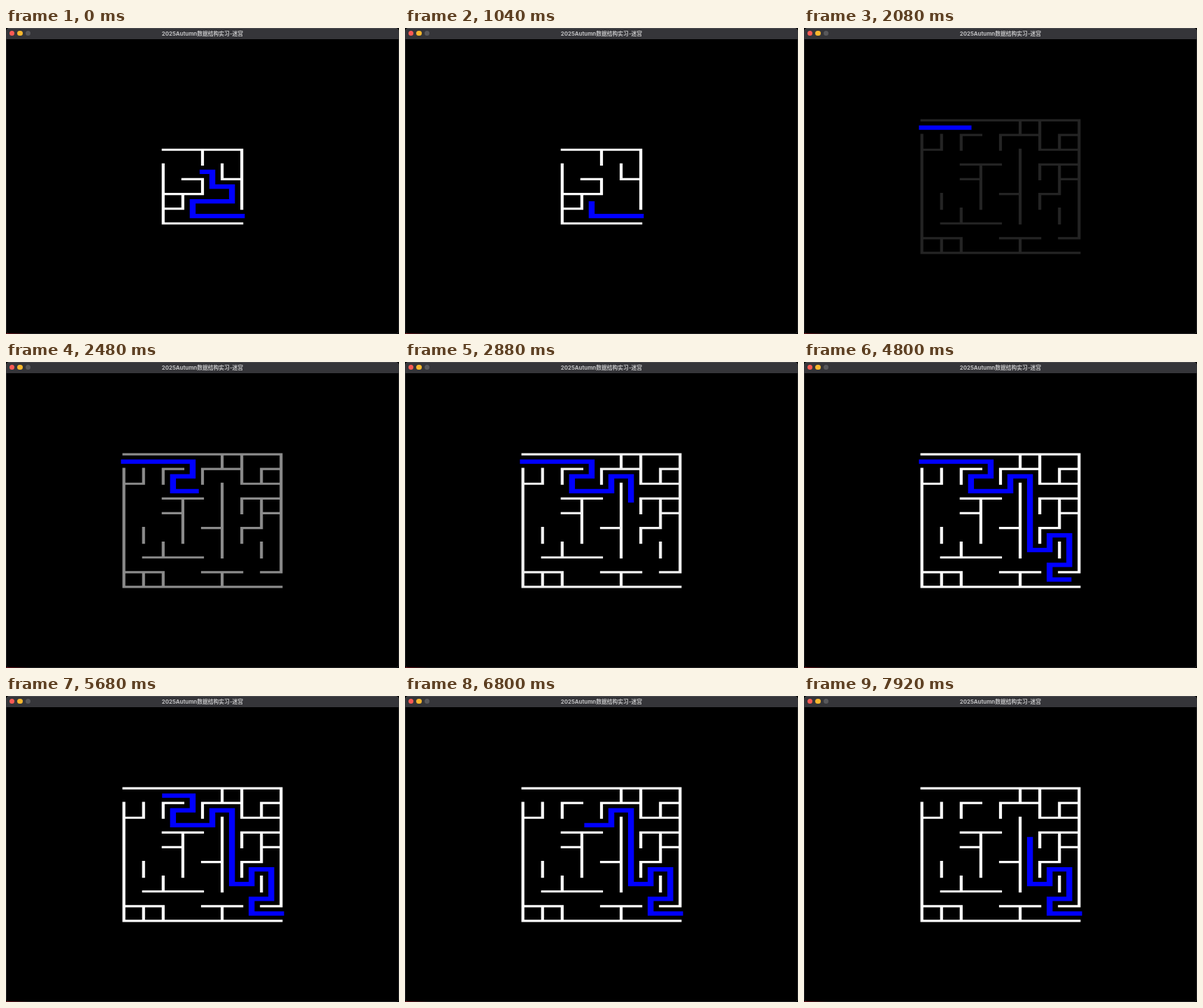
Animation, 562 px wide and 438 px high, one loop 8000 ms. Source, as an HTML page with a canvas:

```html
<!DOCTYPE html>
<html lang="zh">
<head>
<meta charset="utf-8">
<style>
  html, body { margin: 0; width: 100%; height: 100%; overflow: hidden; background: #000; }
  .window { position: absolute; left: 0; top: 0; width: 562px; height: 438px; overflow: hidden; }
  .bar {
    position: absolute; inset: 0 0 auto 0; height: 16px; box-sizing: border-box;
    background: #353539; border-top: 1px solid #4b4b4e; border-radius: 5px 5px 0 0;
    color: #c0c0c2; text-align: center; white-space: nowrap;
    font: 700 7.8px/14px Inter, "Noto Sans CJK SC", "Noto Sans CJK", sans-serif;
  }
  .light { position: absolute; top: 4px; width: 7.4px; height: 7.4px; border-radius: 50%; }
  canvas { position: absolute; left: 0; top: 0; }
  .edge {
    position: absolute; inset: 16px 0 0 0; border: 1px solid #232325; border-top: 0;
    border-radius: 0 0 5px 5px;
  }
  .glow { position: absolute; left: 0; bottom: 0; width: 34px; height: 1px; background: linear-gradient(90deg, #701018, #232325); }
</style>
</head>
<body>
<div class="window">
  <canvas id="stage" width="562" height="438"></canvas>
  <div class="edge"></div>
  <div class="glow"></div>
  <div class="bar">2025Autumn数据结构实习-迷宫</div>
  <div class="light" style="left:4.5px;background:#fb5a54"></div>
  <div class="light" style="left:16.2px;background:#f8b82e"></div>
  <div class="light" style="left:27.9px;background:#58585b"></div>
</div>
<script>
const ctx = document.getElementById('stage').getContext('2d');
const LOOP = 8000, SWITCH = 1940, FADE = 990;
const CELL_W = 28.1, CELL_H = 21.1;

// Coordinates are in cells; each route runs from entrance to exit.
const smallMaze = {
  cols: 4, rows: 5, length: 12,
  walls: new Path2D(`M0 0H4V4 M0 1V5H4 M1 2H2V3 M0 3H2 M0 4H1V3
    M2 0V1 M3 1V2H4`),
  route: new Path2D('M0 .5H1.5V1.5H2.5V2.5H3.5V3.5H1.5V4.5H4'),
};
const largeMaze = {
  cols: 8, rows: 9, length: 24,
  walls: new Path2D(`M0 0H8V8H7 M0 1V9H8 M0 2H1V1 M3 1H2V2 M4 2V1H6
    M8 1H7V2 M6 0V2H8 M5 0V1 M2 3H4 M2 4H3 M3 3V6 M5 2V7 M4 5H5
    M6 4V3H8 M7 4H8 M7 3V5H6V6 M7 6V7 M1 5V6 M2 6V7 M1 7H4
    M0 8H2V9 M1 8V9 M4 8H6 M5 8V9`),
  route: new Path2D('M0 .5H3.5V1.5H2.5V2.5H4.5V1.5H5.5V6.5H6.5V5.5H7.5V7.5H6.5V8.5H8'),
};

// [time in ms, distance in cells]
const smallTail = [[0, 3], [1040, 8.64], [1780, 12]];
const largeHead = [[SWITCH, 0], [2080, 2.36], [2480, 7.65], [2880, 12.12],
  [3520, 17.1], [4080, 20.4], [4400, 22.1], [4960, 24]];
const largeTail = [[5228, 0], [7920, 12.45], [8000, 12.82]];

function along(keys, t) {
  if (t <= keys[0][0]) return keys[0][1];
  for (let i = 1; i < keys.length; i++) {
    const [t0, a] = keys[i - 1], [t1, b] = keys[i];
    if (t < t1) return a + (b - a) * (t - t0) / (t1 - t0);
  }
  return keys[keys.length - 1][1];
}

function drawMaze(maze, tail, head, alpha) {
  ctx.save();
  ctx.translate(281 - maze.cols * CELL_W / 2, 227 - maze.rows * CELL_H / 2);
  ctx.scale(CELL_W, CELL_H);
  ctx.lineCap = 'square';
  ctx.globalAlpha = alpha;
  ctx.strokeStyle = '#fff';
  ctx.lineWidth = 0.15;
  ctx.stroke(maze.walls);
  if (head > tail) {
    ctx.globalAlpha = 1;
    ctx.strokeStyle = '#00f';
    ctx.lineWidth = 0.3;
    ctx.setLineDash([head - tail, 100]);
    ctx.lineDashOffset = -tail;
    ctx.stroke(maze.route);
  }
  ctx.restore();
}

function render(now) {
  const t = now % LOOP;
  ctx.fillStyle = '#000';
  ctx.fillRect(0, 0, 562, 438);
  if (t < SWITCH) {
    drawMaze(smallMaze, along(smallTail, t), smallMaze.length, 1);
  } else {
    const alpha = Math.min(1, (t - SWITCH) / FADE);
    drawMaze(largeMaze, along(largeTail, t), along(largeHead, t), alpha);
  }
}

const start = performance.now();
function tick() {
  render(performance.now() - start);
  requestAnimationFrame(tick);
}
tick();
</script>
</body>
</html>
```
